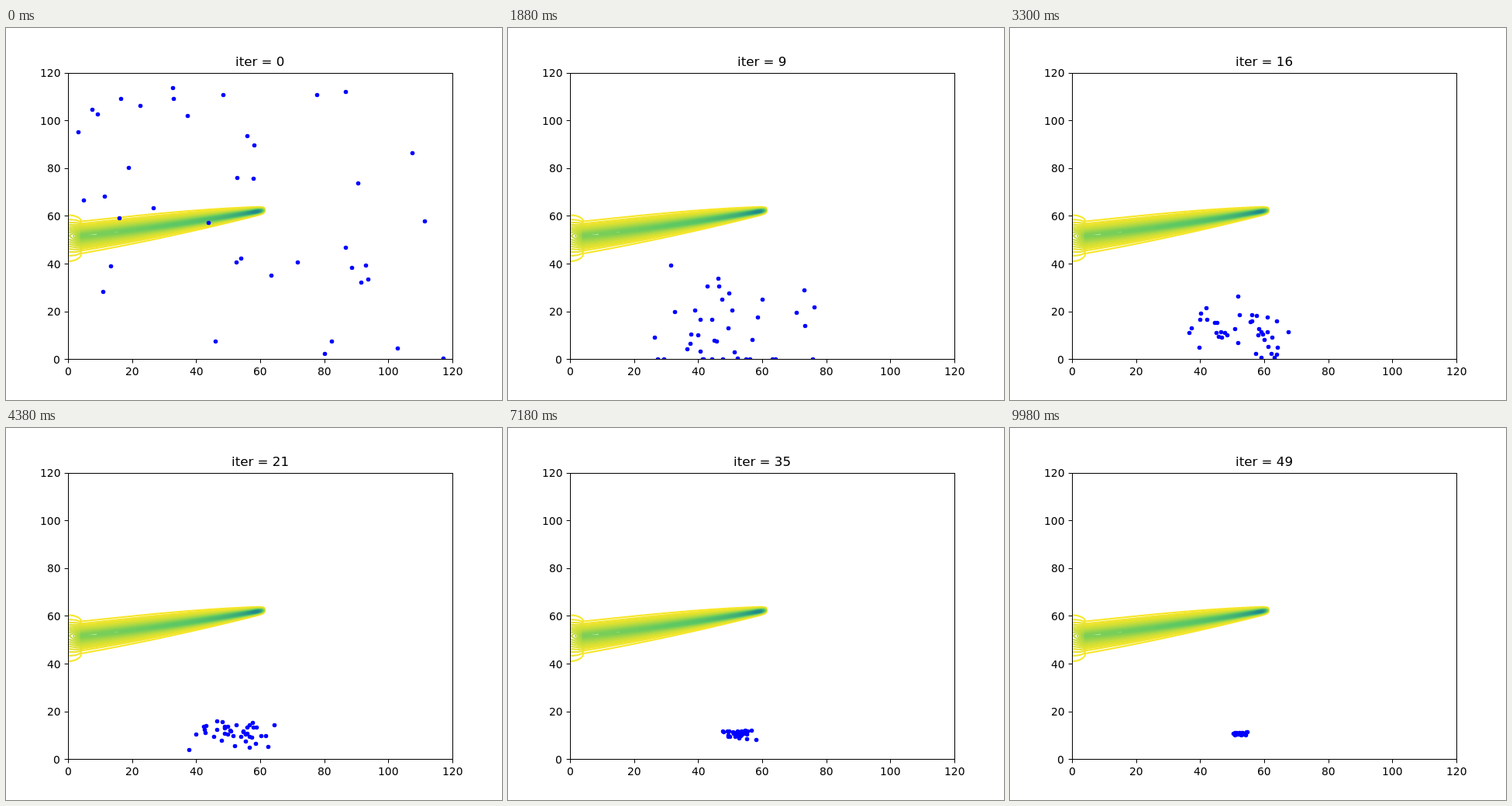
These frames come from a looping animation (640 px wide and 480 px high, 10 s). An HTML page with a canvas:

```html
<!DOCTYPE html>
<html>
<head>
<meta charset="utf-8">
<style>
  html, body { margin: 0; width: 100%; height: 100%; overflow: hidden; background: #fff; }
  canvas { display: block; }
</style>
</head>
<body>
<canvas id="stage" width="640" height="480"></canvas>
<script>
const ctx = document.getElementById('stage').getContext('2d');
const LEFT = 80, RIGHT = 576, TOP = 57.6, BOTTOM = 427.2;
const WIDTH = RIGHT - LEFT, HEIGHT = BOTTOM - TOP;
const FONT = '"DejaVu Sans", sans-serif';
const LOOP = 10000, STEP = 20, ITERATION = 200;

const clamp = (v, low, high) => Math.min(high, Math.max(low, v));

let seed = 20;
function random() {
  seed = (seed * 1664525 + 1013904223) % 4294967296;
  return seed / 4294967296;
}
const bell = () => random() + random() + random() - 1.5;

// Swarm: every particle swings around the best point and settles at its own pace
const BEST = { x: 297.5, y: 394.5 };

function swing(offset, sideways, settleStart, settle) {
  const speed = 0.17 + 0.6 * random();
  return k => offset * Math.exp(-k / settleStart) * Math.cos(speed * k)
            + sideways * Math.exp(-k / settle) * Math.sin(speed * k);
}

const particles = Array.from({ length: 40 }, () => {
  const x = LEFT + WIDTH * random() ** 1.4, y = TOP + HEIGHT * random();
  const settle = 8 + 10 * random();
  return {
    dx: swing(x - BEST.x, 200 * bell(), settle, settle),
    dy: swing(y - BEST.y, 100 * bell(), settle / 2, settle)
  };
});

function drawParticles(g, k) {
  g.fillStyle = '#00f';
  for (const { dx, dy } of particles) {
    const x = clamp(BEST.x + dx(k), LEFT, RIGHT), y = clamp(BEST.y + dy(k), TOP, BOTTOM);
    g.beginPath();
    g.arc(Math.floor(x) + 0.5, Math.floor(y) + 0.5, 2.78, 0, 2 * Math.PI);
    g.fill();
  }
}

// Plume: contour lines of a bell-shaped jet that widens from its tip to the left wall
const NECK = 97, TIP = 334, LEVEL = 0.01;
const viridis = [[253, 231, 37], [94, 201, 98], [33, 145, 140], [59, 82, 139], [68, 1, 84]];

function color(level) {
  const s = level * 4, n = Math.floor(s);
  return `rgb(${viridis[n].map((v, i) => Math.round(v + (viridis[n + 1][i] - v) * (s - n)))})`;
}

function section(x) {
  const u = Math.max(0, (x - NECK) / (TIP - NECK));
  const flare = Math.sqrt(1 - clamp((x - LEFT) / (NECK - LEFT), 0, 1) ** 2);
  const tip = Math.max(0, (x - TIP + 11) / 11);
  const peak = Math.min(0.55, 0.2 * (250 / (TIP + 1 - x)) ** 0.35) * (1 - 0.55 * flare);
  return {
    x, peak,
    value: peak * (1 - tip * tip),
    mid: 268 - 24 * u - 9 * u * u,
    up: 4.5 + 14 * (1 - u ** 2.5) + 8 * flare,
    down: 4.5 + 18.5 * (1 - u) + 10 * flare
  };
}

function drawPlume(g) {
  const sections = [];
  for (let x = LEFT - 2; x < TIP; x += 0.25) sections.push(section(x));
  g.lineWidth = 2.08;
  g.lineJoin = 'round';
  for (let level = LEVEL; level < 0.55; level += LEVEL) {
    const inside = sections.filter(s => s.value >= level);
    const reach = s => (Math.log(s.value / level) / Math.log(s.peak / LEVEL)) ** 0.65;
    g.beginPath();
    for (const s of inside) g.lineTo(s.x, s.mid - s.up * reach(s));
    for (const s of inside.reverse()) g.lineTo(s.x, s.mid + s.down * reach(s));
    g.closePath();
    g.strokeStyle = color(level);
    g.stroke();
  }
}

function drawAxes(g) {
  const snap = v => Math.round(v) + 0.5;
  const label = (text, x, y, align) =>
    g.fillText(text, Math.round(x - g.measureText(text).width * align), y);
  g.strokeStyle = g.fillStyle = '#000';
  g.lineWidth = 1;
  g.font = `13.89px ${FONT}`;
  g.strokeRect(snap(LEFT), snap(TOP), WIDTH, snap(BOTTOM) - snap(TOP));
  g.beginPath();
  for (let v = 0; v <= 120; v += 20) {
    const x = LEFT + WIDTH * v / 120, y = BOTTOM - HEIGHT * v / 120;
    g.moveTo(snap(x), 427.5);
    g.lineTo(snap(x), 432.4);
    g.moveTo(80.5, snap(y));
    g.lineTo(75.6, snap(y));
    label(v, x, 448, 0.5);
    label(v, 70.3, Math.round(y + 5.5), 1);
  }
  g.stroke();
}

const plume = document.createElement('canvas');
plume.width = 640;
plume.height = 480;
drawPlume(plume.getContext('2d'));

function draw(now) {
  const k = Math.floor(now % LOOP / STEP) * STEP / ITERATION;
  ctx.fillStyle = '#fff';
  ctx.fillRect(0, 0, 640, 480);

  ctx.save();
  ctx.beginPath();
  ctx.rect(LEFT, TOP, WIDTH, HEIGHT);
  ctx.clip();
  ctx.drawImage(plume, 0, 0);
  drawParticles(ctx, k);
  ctx.restore();

  drawAxes(ctx);
  ctx.font = `16.67px ${FONT}`;
  const title = `iter = ${Math.floor(k)}`;
  ctx.fillText(title, Math.round(328 - ctx.measureText(title).width / 2), 49);
}

const begin = performance.now();
function loop() {
  draw(performance.now() - begin);
  requestAnimationFrame(loop);
}
loop();
</script>
</body>
</html>
```
